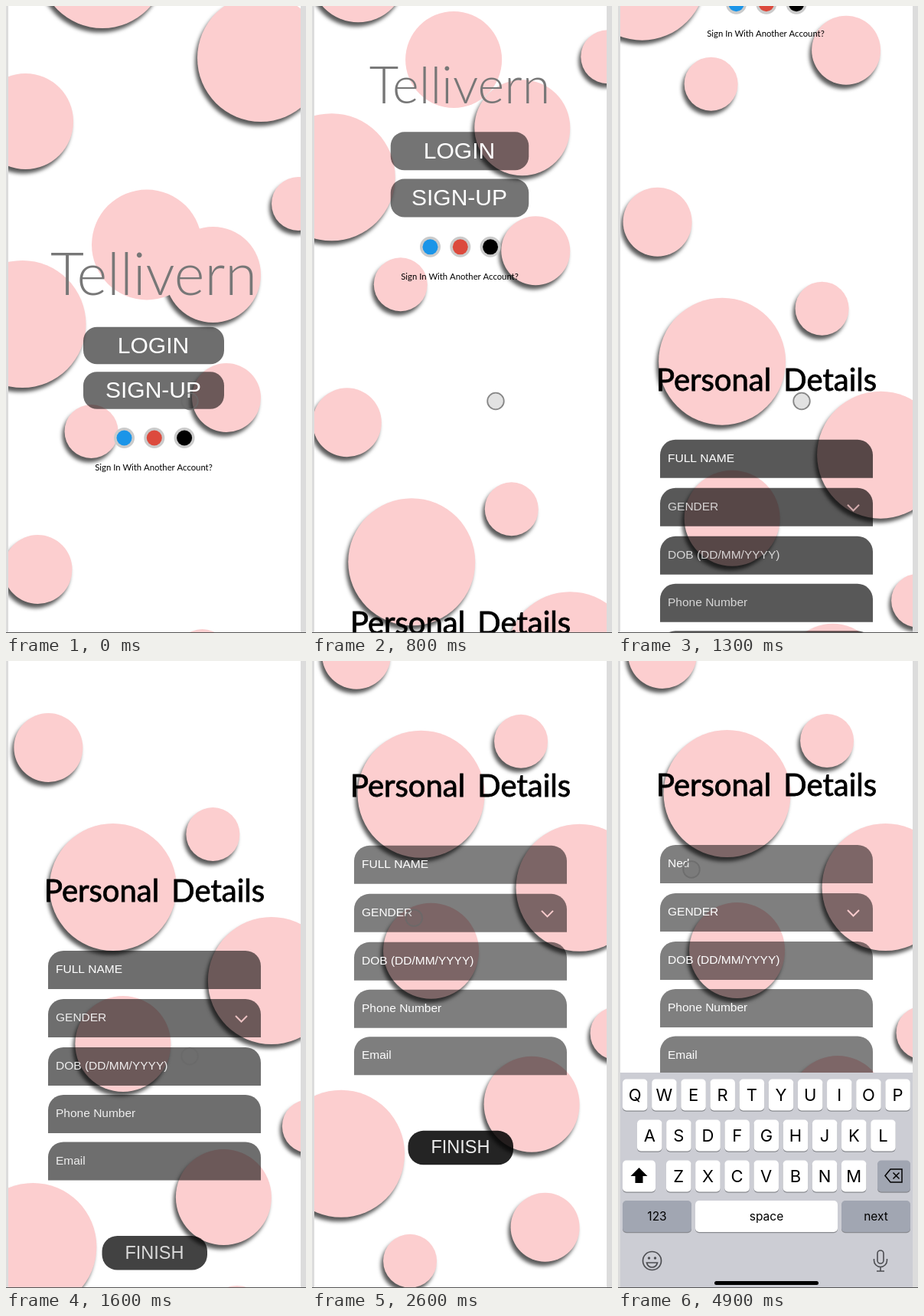
Recreate the animation shown at these times as an HTML page with a canvas. Size 392 by 818 pixels, loop 5000 ms.

```html
<!DOCTYPE html>
<html lang="en">
<head>
<meta charset="utf-8">
<title>Sign-up prototype</title>
<style>
  html, body { margin: 0; width: 100%; height: 100%; overflow: hidden; background: #fff; }
  canvas { display: block; }
</style>
</head>
<body>
<canvas id="stage" width="392" height="818"></canvas>
<script>
const ctx = document.getElementById('stage').getContext('2d');
const LOOP = 5000, STEP = 100;
const PINK = '#fccecf';
const ARIAL = '"Liberation Sans", Arial, sans-serif';
const INTER = 'Inter, sans-serif';
const LATO = 'Lato, sans-serif';

// Scroll knots: time, content offset, lagging background offset
const SCROLL = [
  [0, 0, 0], [200, 40, 31], [400, 40, 31], [500, 89, 69], [1100, 422, 328.5],
  [1600, 754, 622], [2100, 867, 722], [2700, 892, 744]
];

// One background tile: x, y, radius
const BUBBLES = [
  [126, -54, 83], [333, 68, 83], [139, 150.5, 62.5], [382, 258, 35], [270.5, 350.5, 62.5],
  [21.5, 415, 83], [288, 511, 45], [111.5, 555, 35], [41.5, 735, 45], [256.5, 848, 35]
];
const TILE = 971;

const FIELDS = [
  ['FULL NAME', 1132], ['GENDER', 1195], ['DOB (DD/MM/YYYY)', 1258],
  ['Phone Number', 1320], ['Email', 1381.5]
];

const clamp = v => Math.min(1, Math.max(0, v));
const progress = (t, from, to) => clamp((t - from) / (to - from));
const black = a => `rgba(0,0,0,${a})`;
const white = a => `rgba(255,255,255,${a})`;

// Monotone cubic through column `col` of the scroll knots
function scrollAt(t, col) {
  const k = SCROLL, last = k.length - 1;
  if (t >= k[last][0]) return k[last][col];
  const slope = i => i < 0 || i >= last ? 0 : (k[i + 1][col] - k[i][col]) / (k[i + 1][0] - k[i][0]);
  const tangent = i => {
    const a = slope(i - 1), b = slope(i);
    return a * b > 0 ? 2 * a * b / (a + b) : 0;
  };
  const i = k.findIndex((p, n) => t < k[n + 1][0]);
  const h = k[i + 1][0] - k[i][0], u = (t - k[i][0]) / h, v = 1 - u;
  return k[i][col] * (1 + 2 * u) * v * v + k[i + 1][col] * u * u * (3 - 2 * u)
    + h * u * v * (tangent(i) * v - tangent(i + 1) * u);
}

function disc(x, y, r, fill) {
  ctx.beginPath();
  ctx.arc(x, y, r, 0, 7);
  ctx.fillStyle = fill;
  ctx.fill();
}

function box(x, y, w, h, r, fill) {
  ctx.beginPath();
  ctx.roundRect(x, y, w, h, r);
  ctx.fillStyle = fill;
  ctx.fill();
}

function text(s, x, y, font, fill, align = 'center') {
  ctx.font = font;
  ctx.textAlign = align;
  ctx.fillStyle = fill;
  ctx.fillText(s, x, y);
}

function line(path, color, width) {
  ctx.strokeStyle = color;
  ctx.lineWidth = width;
  ctx.stroke(new Path2D(path));
}

function drawBubbles(offset) {
  ctx.save();
  ctx.shadowColor = black(0.65);
  ctx.shadowBlur = 5;
  ctx.shadowOffsetX = -3;
  ctx.shadowOffsetY = 5.5;
  for (const top of [0, TILE]) {
    BUBBLES.forEach(([x, y, r], i) => {
      const enter = top === 0 && i === 2 ? -113.5 + 0.16 * offset : 0;
      disc(x + enter + 0.0223 * offset, y + top - offset, r, PINK);
    });
  }
  ctx.restore();
}

function drawWelcome(c) {
  ctx.save();
  ctx.translate(193, 317.5 - 0.972 * c);
  ctx.scale(1 - 0.0005 * c, 1 - 0.0005 * c);
  disc(-9, -6, 72, PINK);
  text('Tellivern', 0, 59.5, `300 76px ${LATO}`, '#777');
  ctx.restore();

  const button = (label, y, drift) => {
    const mid = y - c * (1 + drift), half = 24.3 + 0.0028 * c, inset = 0.007 * c;
    box(101 + inset, mid - half, 184 - 2 * inset, 2 * half, 18, black(0.57 - 0.0001 * c));
    text(label, 192.5, mid + 9.8, `30px ${ARIAL}`, '#fff');
  };
  button('LOGIN', 443, 0.018);
  button('SIGN-UP', 501.5, 0.007);

  ['#1b95e8', '#dc4a3d', '#000'].forEach((color, i) => {
    const x = 154.5 + 39.3 * i;
    disc(x, 563.5 - c, 13.5, '#cbcbcb');
    disc(x, 563.5 - c, 10, color);
  });
  text('Sign In With Another Account?', 193, 606 - c, `11.3px ${LATO}`, '#000');
}

function drawTitle(y) {
  ctx.save();
  ctx.wordSpacing = '6px';
  text('Personal Details', 194, y, `40px ${LATO}`, '#000');
  ctx.strokeStyle = '#000';
  ctx.lineWidth = 0.8;
  ctx.strokeText('Personal Details', 194, y);
  ctx.restore();
}

function drawForm(c, typed) {
  drawTitle(1068 - c);

  const ink = clamp(0.36 + 0.0007 * c);
  FIELDS.forEach(([label, y], i) => {
    box(55, y - c, 278, 50, [20, 20, 0, 0], black(0.914 - 0.00046 * c));
    text(i ? label : typed || label, 65, y + 29 - c, `15.5px ${ARIAL}`, white(i ? ink : 1), 'left');
  });
  line(`M300 ${1217 - c}l7.5 7.5l7.5 -7.5`, `rgba(251,205,206,${ink})`, 2);

  box(125.5, 1504 - c, 137.5, 44.5, 20, black(clamp(0.74 + 0.00088 * (c - 754))));
  text('FINISH', 194, 1533.5 - c, `23.5px ${ARIAL}`, white(clamp(0.8 + 0.0009 * (c - 754))));
}

function drawCursor(t) {
  const u = progress(t, 2200, 2800), e = u * u * (3 - 2 * u);
  disc(240 - 144 * e, 515.5 - 243.5 * e, 10.8, 'rgba(110,110,110,.2)');
  ctx.strokeStyle = 'rgba(105,105,105,.78)';
  ctx.lineWidth = 1.8;
  ctx.stroke();
}

function drawKey(label, x, y, w, fill, size = 22) {
  box(x, y + 1.2, w, 41, 5, '#888a8f');
  box(x, y, w, 41, 5, fill);
  text(label, x + w / 2, y + 20.5 + size * 0.364, `${size}px ${INTER}`, '#000');
}

function drawKeyboard(dy) {
  const grey = '#a1a6b2', icon = '#4c4d51';
  ctx.save();
  ctx.translate(0, dy);
  box(3, 537, 382, 290, 0, '#cccdd4');
  [['QWERTYUIOP', 6], ['ASDFGHJKL', 25], ['ZXCVBNM', 63]].forEach(([row, x], r) =>
    [...row].forEach((ch, i) => drawKey(ch, x + 38.15 * i, 545.5 + 53 * r, 32.5, '#fff')));

  drawKey('', 6, 651.5, 43, '#fff');
  ctx.fillStyle = '#000';
  ctx.fill(new Path2D('M27.5 661L38.5 672H32.5V681H22.5V672H16.5Z'));
  drawKey('', 339, 651.5, 43, grey);
  line('M356 663H371V680H356L349 671.5ZM359.5 667.5l8 8m0 -8l-8 8', '#000', 1.5);

  drawKey('123', 6, 704, 90, grey, 15.5);
  drawKey('space', 101, 704, 186, '#fff', 15.5);
  drawKey('next', 292, 704, 90, grey, 15.5);

  // Smiley and microphone
  line('M32.5 782.5a12 12 0 1 0 24 0a12 12 0 1 0 -24 0M37.5 785h14q-1.5 6 -7 6t-7 -6Z', icon, 1.7);
  disc(40.5, 779, 1.7, icon);
  disc(48.5, 779, 1.7, icon);
  line('M339 773a4 4 0 0 1 8 0v9a4 4 0 0 1 -8 0ZM334.5 780v2a8.5 8.5 0 0 0 17 0v-2M343 790.5v5.5M338 796h10', icon, 1.6);
  box(126, 809, 136, 5, 2.5, '#000');
  ctx.restore();
}

function draw(t) {
  const c = scrollAt(t, 1);
  const typed = 'Ned'.slice(0, Math.floor(3 * progress(t, 3500, 4700)));
  box(0, 0, 392, 818, 0, '#fff');
  drawBubbles(scrollAt(t, 2));
  drawWelcome(c);
  drawForm(c, typed);
  drawCursor(t);
  if (t >= 3000) drawKeyboard(281 * (1 - progress(t, 3000, 3500)) ** 2.6);
  box(0, 0, 3, 818, 0, '#dcdcdc');
  box(385, 0, 7, 818, 0, '#dcdcdc');
  box(0, 817, 392, 1, 0, '#555');
}

function tick() {
  const t = performance.now() % LOOP;
  draw(Math.floor(t / STEP) * STEP);
  requestAnimationFrame(tick);
}
tick();
</script>
</body>
</html>
```
